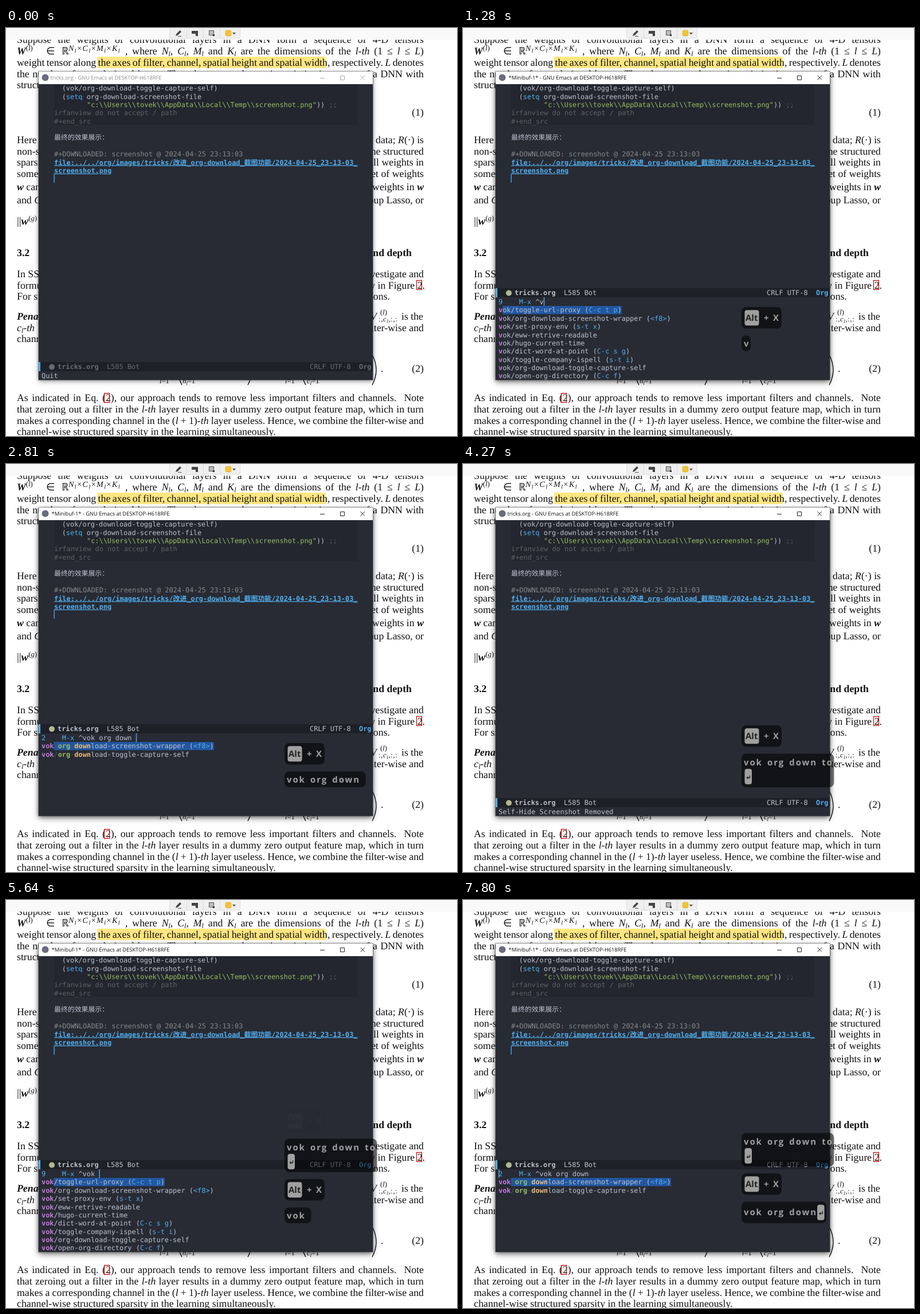
Write an HTML page that moves like this. It is 787 px wide and 712 px high and loops after 8 s.

```html
<!DOCTYPE html>
<html lang="en">
<head>
<meta charset="utf-8">
<title>Toggle command demo</title>
<style>
html, body { margin: 0; width: 100%; height: 100%; overflow: hidden; background: #fff; }
svg { display: block; width: 787px; height: 712px; text-rendering: geometricPrecision; }
text { white-space: pre; }
.doc { font: 17.8px "Liberation Serif", serif; fill: #111; }
.mono { font: 11.9px "DejaVu Sans Mono", "Noto Sans CJK SC", "Noto Sans CJK JP", "Noto Sans CJK", monospace; }
.title { font: 9.3px "Open Sans", sans-serif; }
.cast { font: bold 15px "Open Sans", sans-serif; }
.typed { letter-spacing: 1.9px; word-spacing: 2.4px; }
.i { font-style: italic; }
.b { font-weight: bold; }
</style>
</head>
<body>
<svg id="stage" viewBox="0 0 787 712">
  <defs>
    <filter id="soft" x="-10%" y="-10%" width="120%" height="125%"><feGaussianBlur stdDeviation="6"/></filter>
    <filter id="tight" x="-10%" y="-10%" width="120%" height="120%"><feGaussianBlur stdDeviation="3"/></filter>
  </defs>
  <rect width="787" height="712" fill="#fff"/>
  <g id="paper" class="doc"></g>
  <g id="bar"></g>
  <rect id="wide" x="57" y="81" width="583" height="537" filter="url(#soft)"/>
  <rect x="57" y="78" width="583" height="537" opacity=".4" filter="url(#tight)"/>
  <rect x="57" y="76" width="583" height="538" fill="#282b34"/>
  <rect x="57" y="76" width="583" height="22" fill="#fff"/>
  <g id="head" class="title"></g>
  <g id="buffer" class="mono"></g>
  <g id="panel" class="mono"></g>
  <rect x="56.5" y="75.5" width="584" height="539" fill="none" stroke="#333" stroke-opacity=".45"/>
  <path id="mouse" d="M0 0v10.5l2.4-2.2 1.7 3.8 1.7-.8-1.7-3.6h3.3z" fill="#fff" stroke="#222" stroke-width=".7"/>
  <g id="cast" class="cast"></g>
</svg>
<script>
const $ = id => document.getElementById(id);
const CH = 7.164, ROW = 14.37, LOOP = 8000;
const FG = '#bbc2cf', BLUE = '#51afef', GREEN = '#98be65', DIM = '#5b6268';
const MATCH = ['#c678dd', GREEN, '#ecbe7b', '#51afef'];

const esc = s => s.replace(/&/g, '&amp;').replace(/</g, '&lt;');
const rect = (x, y, w, h, fill, more = '') =>
  `<rect x="${x}" y="${y}" width="${w}" height="${h}" fill="${fill}" ${more}/>`;
const path = (d, more) => `<path d="${d}" fill="none" ${more}/>`;

// ---- paper behind the window ----
const it = s => `<tspan class="i">${s}</tspan>`;
const bd = s => `<tspan class="b">${s}</tspan>`;
const bi = s => `<tspan class="b i">${s}</tspan>`;
const sub = (s, size = 12) => `<tspan class="i" font-size="${size}" baseline-shift="-3">${s}</tspan>`;
const sup = s => `<tspan font-size="12.5" baseline-shift="7">${s}</tspan>`;
const v = (s, k = 'l') => it(s) + sub(k);
const left = (x, y, s, more = '') => `<text x="${x}" y="${y}" ${more}>${s}</text>`;
const right = (y, s, x = 729) => left(x, y, s, 'text-anchor="end"');
const full = (y, s, x = 19) => left(x, y, s, 'data-full="1"');

function drawPaper() {
  const sides = [
    [201, 'Here ' + it('D'), 'data; ' + it('R') + '(·) is'],
    [221, 'non-structured', 'the structured'],
    [240, 'sparsity', 'all weights in'],
    [260, 'some groups', 'set of weights'],
    [283, bi('w') + ' can be', 'weights in ' + bi('w')],
    [306, 'and ' + it('G'), 'group Lasso, or'],
    [435, 'In SSL,', 'investigate and'],
    [529, v('c') + it('-th'), 'filter-wise and'],
    [105, 'structured', ''],
    [153, '', '(1)'],
    [600, '', '(2)']
  ];
  let s = rect(159, 50, 399, 20, '#ffe680');
  s += full(26, 'Suppose the weights of convolutional layers in a DNN form a sequence of 4-D tensors');
  s += left(19, 46, bi('W') + sup('(' + it('l') + ')')) + left(70, 46, '∈') + left(97, 46, 'ℝ');
  s += left(109, 39.5, ['N', 'C', 'M', 'K'].map(c => it(c) + sub('l', 10)).join('×'),
    'font-size="14" letter-spacing="1.5"');
  s += full(46, `, where ${v('N')}, ${v('C')}, ${v('M')} and ${v('K')} are the dimensions of the ${it('l-th')} (1 ≤ ${it('l')} ≤ ${it('L')})`, 208);
  s += full(66, `weight tensor along the axes of filter, channel, spatial height and spatial width, respectively. ${it('L')} denotes`);
  s += full(85.5, 'the number of convolutional layers. Then the proposed generic optimization target of a DNN with');
  for (const [y, a, b] of sides) s += left(19, y, a) + right(y, b);
  s += left(19, 343, '||' + bi('w') + sup('(' + it('g') + ')'), 'font-size="19"');
  s += left(19, 398, bd('3.2')) + right(398, bd('and depth'), 708);
  s += left(19, 455, 'formulation') + right(455, 'y in Figure 2.', 731);
  s += left(19, 474, 'For simplicity') + right(474, 'dimensions.', 670);
  s += left(19, 509, bi('Penalizing')) + right(509, 'is the', 728) + left(636, 509, it('V'));
  s += left(653, 500, '(' + it('l') + ')', 'font-size="12.5"');
  s += left(650, 512, ':,' + it('c') + sub('l', 9) + ',:,:', 'font-size="12.5" letter-spacing=".7"');
  s += left(19, 548, 'channel-wise') + left(654, 600, '.');
  for (const [x, k] of [[268, 'l'], [308, 'n'], [487, 'l'], [525, 'c']])
    s += left(x, 620, k === 'l' ? it('l') + '=1' : it(k) + sub('l', 9) + '=1', 'font-size="12.5"');
  for (const [x, d] of [[307, -14], [422, 14], [523, -14], [639, 14]])
    s += path(`M${x} 570q${d} 27 0 53`, 'stroke="#111" stroke-width="1.4"');
  s += full(651, 'As indicated in Eq. (2), our approach tends to remove less important filters and channels.  Note');
  s += full(670.5, `that zeroing out a filter in the ${it('l-th')} layer results in a dummy zero output feature map, which in turn`);
  s += full(690.5, `makes a corresponding channel in the (${it('l')} + 1)${it('-th')} layer useless. Hence, we combine the filter-wise and`);
  s += left(19, 710, 'channel-wise structured sparsity in the learning simultaneously.');
  for (const [x, y] of [[716.5, 440.5], [171.5, 637.5]])
    s += rect(x, y, 9, 16, 'none', 'stroke="#d01010" stroke-width="1.3"');
  $('paper').innerHTML = s;
  document.querySelectorAll('[data-full]').forEach(e => {
    const gaps = e.textContent.split(' ').length - 1;
    const room = 729 - e.getAttribute('x') - e.getComputedTextLength();
    e.style.wordSpacing = room / gaps + 'px';
  });
}

function drawBar() {
  let s = rect(0, 0, 787, 20.5, '#f9f9f9');
  s += rect(285.5, -4, 123, 22, '#efefef', 'rx="3" stroke="#dedede"');
  for (const x of [315, 344, 373]) s += rect(x, 0, 1, 18, '#dcdcdc');
  s += '<path d="M296 14l1.5-4 6-6 2.5 2.5-6 6zM300 14h6v1h-6z" fill="#444"/>';
  s += '<path d="M324 5h11v9h-4v-4h-7z" fill="#444"/>';
  s += rect(354.5, 4.5, 8, 8, '#bbb', 'stroke="#555"') + rect(361, 11, 3, 3, '#333');
  s += rect(383, 4, 10, 10, '#f2c335', 'rx="2.5" stroke="#d9a514" stroke-width=".6"');
  s += '<path d="M395 8h6l-3 3.5z" fill="#555"/>';
  $('bar').innerHTML = s;
}

// ---- editor ----
// parts: [text, colour, bold, underline]
const line = (x, mid, ...parts) => `<text x="${x}" y="${mid + 4.2}">` + parts.map(([t, c = FG, b, u]) =>
  `<tspan fill="${c}"${b ? ' font-weight="bold"' : ''}${u ? ' text-decoration="underline"' : ''}>${esc(t)}</tspan>`).join('') + '</text>';

function drawBuffer() {
  const row = n => 105 + n * ROW;
  $('buffer').innerHTML = rect(84, 98, 530, 71, '#23262e') +
    line(97.7, row(0), ['(vok/org-download-toggle-capture-self)']) +
    line(97.7, row(1), ['('], ['setq', BLUE], [' org-download-screenshot-file']) +
    line(141, row(2), ['"c:\\\\Users\\\\tovek\\\\AppData\\\\Local\\\\Temp\\\\screenshot.png"', GREEN], ['))'], [' ;;', DIM]) +
    line(84, row(3), ['irfanview do not accept / path', DIM]) +
    line(84, row(4), ['#+end_src', DIM]) +
    line(84, row(6), ['最终的效果展示：']) +
    line(84, row(8), ['#+DOWNLOADED: screenshot @ 2024-04-25 23:13:03', '#83898d']) +
    line(84, row(9), ['file:../../org/images/tricks/改进_org-download_截图功能/2024-04-25_23-13-03_', BLUE, 1, 1]) +
    line(84, row(10), ['screenshot.png', BLUE, 1, 1]);
}

const ALL = ['flycheck-list-errors|C-c ! l', 'pr-ps-file-preview', 'eshell-insert-buffer-name',
  'calendar-forward-week', 'org-indent-drawer', 'sgml-mode', 'help-follow-symbol',
  'cpp-parse-edit', 'dired-unmark-all-marks'];
const OWN = ['toggle-url-proxy|C-c t p', 'org-download-screenshot-wrapper|<f8>', 'set-proxy-env|s-t x',
  'eww-retrive-readable', 'hugo-current-time', 'dict-word-at-point|C-c s g',
  'toggle-company-ispell|s-t i', 'org-download-toggle-capture-self',
  'open-org-directory|C-c f'].map(s => 'vok/' + s);

function candidates(query) {
  if (!query) return ALL.map(s => ({ item: s, hits: [] }));
  const re = new RegExp('^(' + query.trim().split(/ +/).join(')(.*?)(') + ')');
  return OWN.map(item => ({ item, hits: (item.split('|')[0].match(re) || []).slice(1) }))
    .filter(c => c.hits.length);
}

function drawList(query, caret) {
  const found = candidates(query);
  const count = query ? found.length : 5360;
  let s = '';
  found.forEach(({ item, hits }, n) => {
    const [name, key] = item.split('|');
    const mid = 492.2 + n * ROW, head = (hits[0] || '').length;
    const size = name.length + (key ? key.length + 3 : 0);
    if (!n) s += rect(62 + head * CH, mid - 7.2, (size - head) * CH, ROW, '#2257a0');
    const parts = hits.map((h, k) => k % 2 ? [h, '#4d5259'] : [h, MATCH[k / 2], 1]);
    parts.push([name.slice(hits.join('').length)]);
    if (key) parts.push([' ('], [key, BLUE], [')']);
    s += line(62, mid, ...parts);
  });
  s += line(62, 478, [String(count).padEnd(5) + 'M-x ', BLUE], ['^' + query]);
  if (caret) s += rect(caret === 'start' ? 62 : 62 + (10 + query.length) * CH, 470, 1.4, 15, BLUE);
  return s;
}

function drawMode(y, on) {
  const c = on ? FG : '#666b75';
  return rect(57, y, 583, 16, '#1e2027') + rect(57, y, 3, 16, BLUE) +
    `<circle cx="80" cy="${y + 8.5}" r="5" fill="${on ? '#b3b88f' : '#666b75'}"/>` +
    line(90, y + 8.2, ['tricks.org', c, 1], ['  L585 Bot', c]) +
    line(530, y + 8.2, ['CRLF UTF-8', c]) + line(616, y + 8.2, ['Org', on ? BLUE : c, 1]);
}

function drawHead(name, on) {
  const c = on ? '#111' : '#8c8c8c', k = on ? '#222' : '#aaa';
  return '<circle cx="68.5" cy="86.5" r="6" fill="#696c7d"/>' +
    `<text x="${name[0] === '*' ? 79.5 : 77.5}" y="90" fill="${c}">${name} - GNU Emacs at DESKTOP-H618RFE</text>` +
    path('M548 87.5h8M583.5 83.5h7v7h-7zM618.5 83l7.5 7.5m0-7.5l-7.5 7.5', `stroke="${k}"`);
}

// ---- key display ----
const INK = '#a0a0a0';
const probe = $('stage').appendChild(document.createElementNS('http://www.w3.org/2000/svg', 'text'));
probe.setAttribute('class', 'cast typed');
probe.setAttribute('visibility', 'hidden');
const widthOf = s => (probe.textContent = s, probe.getComputedTextLength());

const cap = (x, mid, w) => rect(x, mid - 13.5, w, 27, INK, 'rx="4"');
const enterKey = (x, mid) => cap(x, mid, 12.5) +
  path(`M${x + 9} ${mid - 2}v4h-5m2-2l-2 2 2 2`, 'stroke="#222" stroke-width="1.3"');

function chord(withX) {
  return { w: withX ? 70 : 36, h: 37.5, draw: y => cap(491.5, y + 18.7, 25) +
    `<text x="493" y="${y + 24.3}" fill="#222">Alt</text>` +
    (withX ? `<text x="525" y="${y + 24.3}" fill="${INK}">+</text><text x="541" y="${y + 24.3}" fill="${INK}">X</text>` : '') };
}

function typedGroup(text, enter) {
  const len = widthOf(text), wrap = enter && len > 140;
  const mid = enter && !wrap ? 18.7 : wrap ? 15 : 14;
  return { w: len + (enter && !wrap ? 20 : 5.5) , h: wrap ? 58.5 : enter ? 37.5 : 27.5, draw: y =>
    `<text class="typed" x="490" y="${y + mid + 5}" fill="${INK}">${text}</text>` +
    (wrap ? enterKey(491.5, y + 40) : enter ? enterKey(490 + len, y + mid) : '') };
}

function drawCast(groups) {
  let y = 564, s = '';
  for (const g of groups.reverse()) {
    y -= g.h;
    s += `<g opacity="${g.alpha ?? 1}">` + rect(486, y, g.w, g.h, '#000', 'rx="8" fill-opacity=".55"') + g.draw(y) + '</g>';
    y -= 12;
  }
  return s;
}

// ---- timeline ----
const FIRST = { text: 'vok org down to', alt: 550, open: 630, enter: 3680, close: 3760,
  keys: [1280, 1450, 1560, 1670, 1780, 1860, 2080, 2120, 2370, 2510, 2590, 2680, 2810, 3010, 3090] };
const SECOND = { text: 'vok org down', alt: 4720, open: 4850, enter: 7750, close: LOOP,
  keys: [5180, 5350, 5510, 5640, 5970, 6380, 6540, 6590, 6820, 6890, 7180, 7260] };
const soFar = (run, t) => run.text.slice(0, run.keys.filter(k => k <= t).length);

function castGroups(t) {
  const out = [];
  for (const run of [FIRST, SECOND]) {
    if (t < run.alt) continue;
    const alt = chord(t >= run.open), text = soFar(run, t);
    if (run === FIRST && t > 5510) alt.alpha = Math.max(0.03, 1 - (t - 5510) / 130);
    if (run === SECOND || t < 5680) out.push(alt);
    if (text) out.push(typedGroup(text, t >= run.enter));
  }
  return out;
}

const shown = {};
function put(id, html) {
  if (shown[id] !== html) $(id).innerHTML = shown[id] = html;
}

function render(t) {
  const on = t >= 340;
  const run = [FIRST, SECOND].find(r => t >= r.open && t < r.close);
  put('head', drawHead(run ? '*Minibuf-1*' : 'tricks.org', on));
  let s = t >= 4270 && t < 4720 ? '' : rect(83.5, 255, 1.3, 15, BLUE);
  s += drawMode(run ? 454 : 583, on);
  if (run) {
    const blink = (t >= 1120 && t < 1280) || (t >= 7750 && t < 7800);
    s += drawList(soFar(run, t), blink ? '' : t >= 7800 ? 'start' : 'end');
  } else {
    s += line(62, 607, [t < FIRST.open ? 'Quit' : 'Self-Hide Screenshot Removed']);
  }
  put('panel', s);
  put('cast', drawCast(castGroups(t)));

  const p = Math.min(1, Math.max(0, (t - 40) / 330));
  const ease = 1 - (1 - p) ** 2;
  $('mouse').setAttribute('visibility', t >= 40 && t < 1280 ? 'visible' : 'hidden');
  $('mouse').setAttribute('transform', `translate(${656 - 261 * ease} ${638 - 196 * ease})`);
  $('wide').setAttribute('opacity', 0.18 + 0.27 * p);
}

drawPaper();
drawBar();
drawBuffer();
const begin = performance.now();
function tick() {
  render((performance.now() - begin) % LOOP);
  requestAnimationFrame(tick);
}
tick();
</script>
</body>
</html>
```
